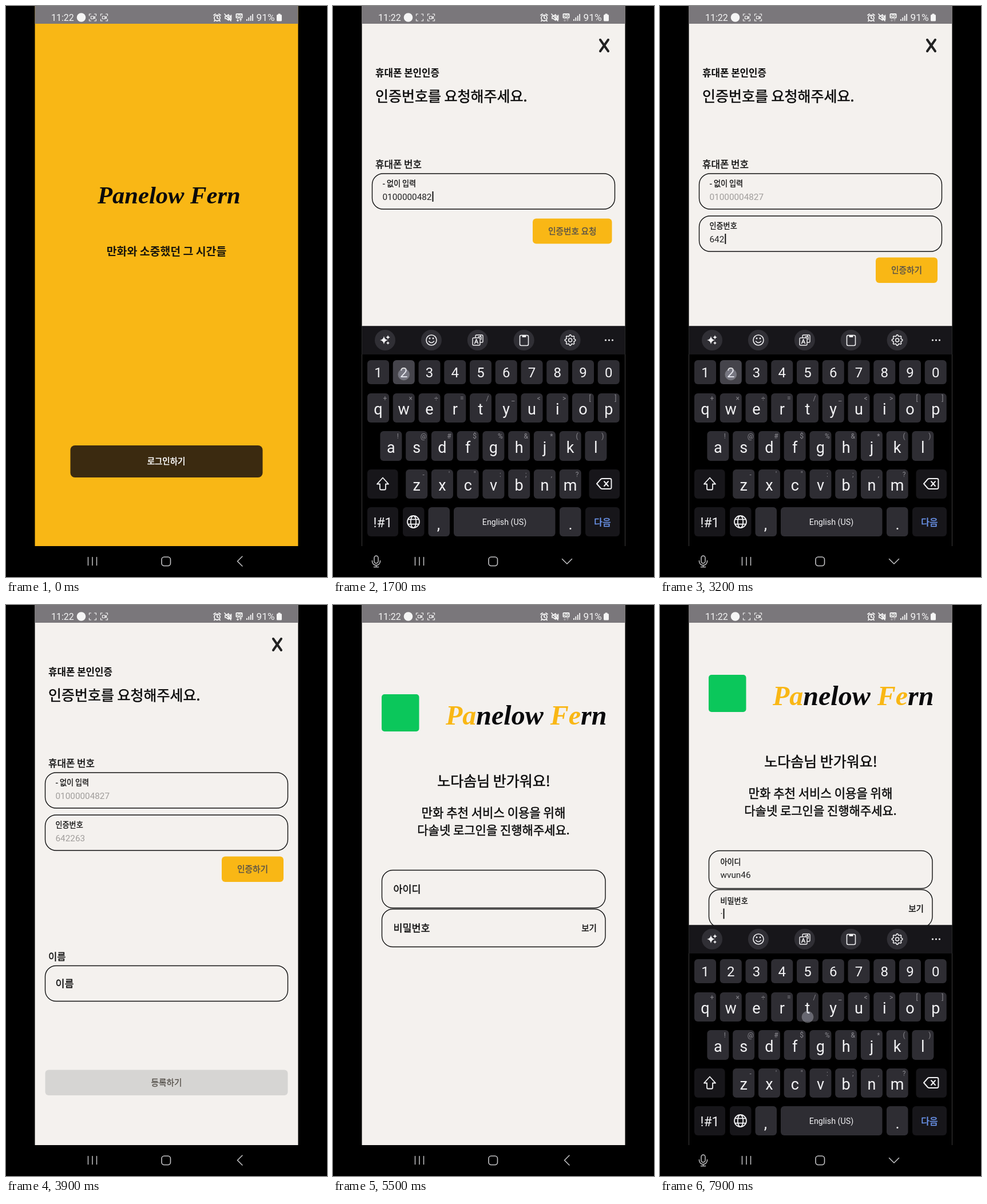
Animation of 561 by 998 pixels, one loop 8000 ms. Source, as an HTML page with a canvas:

```html
<!DOCTYPE html>
<html lang="ko">
<head>
<meta charset="utf-8">
<style>
html, body { margin: 0; width: 100%; height: 100%; overflow: hidden; background: #000; }
canvas { display: block; width: 561px; height: 998px; }
</style>
</head>
<body>
<canvas id="stage" width="561" height="998"></canvas>
<script>
const ctx = document.getElementById('stage').getContext('2d');
const LOOP = 8000, STEP = 100;
const KR = '"Noto Sans CJK KR", "Noto Sans CJK", sans-serif';
const LATIN = 'Roboto, "Noto Sans CJK KR", sans-serif';
const SCRIPT = '"Liberation Serif", serif';
const CREAM = '#f4f1ee', YELLOW = '#f9b715', KEY = '#2e2d33', DARK_KEY = '#17161a';
const LEFT = 50.5, RIGHT = 510.5, NAV_TOP = 944, KB_TOP = 559.5, KB_SLIDE = 439;

const BRAND = ['Pa', 'nelow ', 'Fe', 'rn'];
const PHONE = '01000004827', CODE = '642263', USER = 'wvun46', PERSON = '노다솜';
const COMPOSE = ['', 'ㄴ', '노', '노ㄷ', '노다', '노다소', PERSON];

// open, close, slides
const BOARDS = [[300, 2300, true], [2900, 3700, false], [4100, 4800, false], [5800, 9000, true]];
const ROWS = [
  { keys: '1234567890', x: 60, y: 619, h: 42, size: 24, hints: '' },
  { keys: 'qwertyuiop', x: 60, y: 677, h: 51, size: 27, hints: '+×÷=/_<>[]' },
  { keys: 'asdfghjkl', x: 82.4, y: 743, h: 52, size: 27, hints: '!@#$%&*()' },
  { keys: 'zxcvbnm', x: 127.2, y: 810, h: 51, size: 27, hints: '-\'":;,?' }
];
const PITCH = 44.75, KEY_W = 38;
const JAMO = ['ㄱㅋ', 'ㅣㅡ', 'ㅏㅑ', 'ㄷㅌ', 'ㄴㄹ', 'ㅓㅕ', 'ㅁㅅ', 'ㅂㅍ', 'ㅗㅛ', 'ㅈㅊ', 'ㅇㅎ', 'ㅜㅠ'];

// start, end, x, y
const TOUCHES = [
  [100, 300, 300, 797], [2000, 2200, 420, 395], [2800, 2900, 290, 399], [3600, 3700, 432, 463],
  [4000, 4100, 260, 663], [4900, 5200, 438, 834], [5700, 5800, 280, 497], [6200, 6400, 468, 884],
  [7300, 7400, 270, 545], [7700, 7800, 370, 838], [7900, 8000, 258, 720]
];
const presses = [];

function keyCenter(c) {
  const row = ROWS.find(r => r.keys.includes(c));
  return [row.x + row.keys.indexOf(c) * PITCH + KEY_W / 2, row.y + row.h / 2 + 4];
}
function jamoBox(i) {
  return [62 + (i % 3) * 111.7, 622 + Math.floor(i / 3) * 78.8, 102, 69];
}
function addPresses(str, start) {
  [...str].forEach((c, i) => {
    const at = start + i * STEP;
    presses.push([at, c]);
    TOUCHES.push([at, at + STEP, ...keyCenter(c)]);
  });
}
addPresses(PHONE, 800);
addPresses(CODE, 3000);
addPresses(USER, 6600);
[4, 8, 3, 2, 6, 6].forEach((k, i) => {
  const [x, y, w, h] = jamoBox(k);
  TOUCHES.push([4200 + i * STEP, 4300 + i * STEP, x + w / 2, y + h / 2 + 6]);
});

const clamp = (v, a, b) => Math.max(a, Math.min(b, v));
const ease = p => { p = clamp(p, 0, 1); return p * p * (3 - 2 * p); };
const count = (t, start, max) => clamp(Math.floor((t - start) / STEP) + 1, 0, max);
const typed = (str, t, start) => str.slice(0, count(t, start, str.length));

// y is the visual middle of the line; Hangul gets a hairline outline for a medium weight
function text(str, x, y, size, { color = '#0b0b0b', align = 'left', weight = 400, font = KR, heavy = 0.022 } = {}) {
  ctx.font = `${weight} ${size}px ${font}`;
  ctx.textAlign = align;
  ctx.fillStyle = ctx.strokeStyle = color;
  ctx.fillText(str, x, y + size * 0.37);
  if (font === KR && weight === 400) {
    ctx.lineWidth = size * heavy;
    ctx.strokeText(str, x, y + size * 0.37);
  }
  return ctx.measureText(str).width;
}
function box(x, y, w, h, r, fill, stroke, lw = 1.4) {
  ctx.beginPath();
  ctx.roundRect(x, y, w, h, r);
  if (fill) { ctx.fillStyle = fill; ctx.fill(); }
  if (stroke) { ctx.strokeStyle = stroke; ctx.lineWidth = lw; ctx.stroke(); }
}
function disc(x, y, r, fill) {
  ctx.beginPath();
  ctx.arc(x, y, r, 0, Math.PI * 2);
  ctx.fillStyle = fill;
  ctx.fill();
}
function icon(d, x, y, { color = '#f2f2f4', lw = 1.6, fill = false, scale = 1 } = {}) {
  ctx.save();
  ctx.translate(x, y);
  ctx.scale(scale, scale);
  ctx.lineWidth = lw;
  ctx.lineCap = ctx.lineJoin = 'round';
  ctx.strokeStyle = ctx.fillStyle = color;
  const path = new Path2D(d);
  if (fill) ctx.fill(path); else ctx.stroke(path);
  ctx.restore();
}

function brand(x, y, size, accent) {
  BRAND.forEach((part, i) => {
    x += text(part, x, y, size, { font: SCRIPT, weight: 'italic 700', color: i % 2 ? '#0a0a0c' : accent });
  });
}
function button(x, y, w, h, label, fill, color = '#55504a', size = 14.7) {
  box(x, y, w, h, 6, fill);
  text(label, x + w / 2, y + h / 2, size, { align: 'center', color });
}
function field(x, y, w, h, pad, label, value, { focus = false, color = '#222' } = {}) {
  box(x, y, w, h, 19, null, '#111');
  const mid = y + h / 2, tx = x + pad;
  if (!focus && !value) { text(label, tx, mid, 17.4); return; }
  text(label, tx, mid - 13.5, 13.1);
  const hangul = /[ㄱ-힣]/.test(value);
  const tw = text(value, tx, mid + 9, hangul ? 14.6 : 15.3, { color, font: hangul ? KR : LATIN });
  if (focus && value) {
    ctx.fillStyle = '#111';
    ctx.fillRect(tx + tw + 1, mid, 2, 18);
  }
}

function loginPage() {
  ctx.fillStyle = YELLOW;
  ctx.fillRect(LEFT, 0, RIGHT - LEFT, NAV_TOP);
  brand(160, 329, 42.6, '#0a0a0c');
  text('만화와 소중했던 그 시간들', 280.5, 429, 19.4, { align: 'center', weight: 700, color: '#1a160c' });
  box(112.5, 768, 336, 56, 8, '#3b2a10');
  text('로그인하기', 280, 796, 14.5, { align: 'center', color: '#fff', heavy: 0.04 });
}

function verifyPage(t) {
  icon('M-7-10L7 10M7-10L-7 10', 474, 69, { color: '#222', lw: 4 });
  text('휴대폰 본인인증', 74, 117, 16.8, { weight: 700 });
  text('인증번호를 요청해주세요.', 74, 158, 25);
  text('휴대폰 번호', 74, 277, 16.8);
  const sent = t >= 2200, checked = t >= 3700;
  field(68.5, 293, 424, 62, 18, '- 없이 입력', typed(PHONE, t, 800),
    { focus: t >= 400 && !sent, color: sent ? '#a09d9b' : '#222' });
  if (!sent) {
    button(349, 371.5, 138.5, 44, '인증번호 요청', YELLOW);
  } else {
    field(68.5, 367, 424, 62, 18, '인증번호', typed(CODE, t, 3000),
      { focus: t >= 2900 && !checked, color: checked ? '#a09d9b' : '#222' });
    button(377, 439.5, 108, 44.5, '인증하기', YELLOW);
  }
  if (t < 3800) return;
  const name = COMPOSE[count(t, 4200, COMPOSE.length - 1)];
  text('이름', 74, 615, 16.6);
  field(68.5, 630.5, 424, 62, 18, '이름', name, { focus: t >= 4100 && t < 4800 });
  button(68.5, 812.5, 424, 44.5, '등록하기', name ? YELLOW : '#d6d5d3');
}

function welcomePage(t) {
  box(85, 156, 65.5, 65, 5, '#0bc75b');
  brand(197, 191, 48, YELLOW);
  const mid = { align: 'center' };
  text(PERSON + '님 반가워요!', 281, 308, 25, mid);
  text('만화 추천 서비스 이용을 위해', 280.5, 363, 21.1, mid);
  text('다솔넷 로그인을 진행해주세요.', 280.5, 393, 21, mid);
  field(85.5, 463.5, 390.5, 66, 20, '아이디', typed(USER, t, 6600), { focus: t >= 5800 && t < 7400 });
  const secret = t >= 7900 ? '·' : t >= 7800 ? 'n' : '';
  field(85.5, 531.5, 390.5, 66, 20, '비밀번호', secret, { focus: t >= 7400 });
  text('보기', 461, 565, 14.6, { align: 'right' });
}

function statusBar(t) {
  ctx.fillStyle = '#7a777b';
  ctx.fillRect(LEFT, 0, RIGHT - LEFT, 31);
  const white = { color: '#f5f5f5', font: LATIN };
  text('11:22', 79, 20, 16, white);
  disc(131.5, 20, 7.8, '#f5f5f5');
  const thin = { color: '#f5f5f5', lw: 1.2 };
  [151.5, 171.5].forEach((x, i) => {
    icon('M-6-3V-6H-3M3-6H6V-3M6 3V6H3M-3 6H-6V3', x, 20, thin);
    if (i || t % 1000 < 700) icon('M-3-2H1.5V2.5H-3ZM1.5 0L4-1.5V2L1.5.8', x, 20, thin);
  });
  icon('M5 1A5 5 0 1 1-5 1A5 5 0 1 1 5 1M0-2V1L2 2M-6-4L-3-6M6-4L3-6M-4 5L-5 6.5M4 5L5 6.5', 369, 20, { ...thin, lw: 1.8 });
  icon('M-5-2H-3L1-5V5L-3 2H-5ZM3-3L4-1L3 1L4 4M5.5-4V4M-6-6L5 6', 388, 20, { ...thin, lw: 1.7 });
  box(401.5, 13, 12, 8.5, 1.5, '#f5f5f5');
  text('5G', 407.5, 17.3, 8, { align: 'center', weight: 700, color: '#777', font: LATIN });
  const busy = t < 300 || (t >= 3500 && t < 4300);
  icon('M-2.5 1V5M-4 3.5L-2.5 5L-1 3.5M2.5 5V1M1 2.5L2.5 1L4 2.5', 407.5, 21.5, { color: busy ? '#f5f5f5' : '#aaa7aa', lw: 1.1 });
  ctx.fillStyle = '#f5f5f5';
  for (let i = 0; i < 4; i++) ctx.fillRect(420 + i * 3.4, 23 - i * 3, 1.8, 3 + i * 3);
  text('91%', 437.5, 20, 17.3, white);
  box(473, 15, 9, 11.5, 1.5, '#f5f5f5');
  ctx.fillRect(475.5, 13.5, 4, 2);
}

function globe(x, y, scale = 1) {
  icon('M10 0A10 10 0 1 1-10 0A10 10 0 1 1 10 0M4.5 0A4.5 10 0 1 1-4.5 0A4.5 10 0 1 1 4.5 0M-9-4H9M-9 4H9', x, y, { lw: 1.7, scale });
}
function backspace(x, y, scale = 1) {
  icon('M-13 0L-6-8Q-5-9-3-9H10Q12.5-9 12.5-6.5V6.5Q12.5 9 10 9H-3Q-5 9-6 8ZM0-4L7 4M7-4L0 4', x, y, { lw: 1.9, scale });
}

function toolbar() {
  ctx.fillStyle = '#17161a';
  ctx.fillRect(LEFT, KB_TOP, RIGHT - LEFT, 49.5);
  const y = 584;
  for (let i = 0; i < 5; i++) disc(91 + i * 80.9, y, 18, '#302f35');
  icon('M-2-7Q-1-1 5 0Q-1 1-2 7Q-3 1-9 0Q-3-1-2-7ZM5-9Q5.5-5.5 9-5Q5.5-4.5 5-1Q4.5-4.5 1-5Q4.5-5.5 5-9ZM5 2Q5.5 4.5 8 5Q5.5 5.5 5 8Q4.5 5.5 2 5Q4.5 4.5 5 2Z', 91, y, { fill: true });
  icon('M9 0A9 9 0 1 1-9 0A9 9 0 1 1 9 0M-4.5 2Q0 7 4.5 2', 172, y);
  disc(169, 581, 1.4, '#f2f2f4');
  disc(175, 581, 1.4, '#f2f2f4');
  icon('M-4-4V-7Q-4-9-2-9H7Q9-9 9-7V2Q9 4 7 4H4M-7-4H2Q4-4 4-2V7Q4 9 2 9H-7Q-9 9-9 7V-2Q-9-4-7-4ZM-5.5 6L-2.5-1.5L.5 6M-4.5 3.5H-.5M1-6H6L4.5-7.5M6-6V-1', 253, y, { lw: 1.4 });
  box(326.5, 575.5, 15, 18, 2.5, null, '#f2f2f4', 1.6);
  box(330.5, 575, 7, 4, 1, '#f2f2f4');
  ctx.beginPath();
  for (let i = 0; i <= 64; i++) {
    const a = i / 64 * Math.PI * 2, r = 8.2 + 1.2 * Math.cos(a * 8);
    ctx.lineTo(414.6 + r * Math.cos(a), y + r * Math.sin(a));
  }
  ctx.lineWidth = 1.6;
  ctx.strokeStyle = '#f2f2f4';
  ctx.stroke();
  box(411.6, 581, 6, 6, 3, null, '#f2f2f4', 1.5);
  [476.5, 482.5, 488.5].forEach(x => disc(x, y, 1.6, '#f2f2f4'));
}

const glyph = { color: '#f2f2f4', align: 'center', font: LATIN };
const hint = { color: '#8b8a90', align: 'center', font: LATIN };
const next = { color: '#6f9af5', align: 'center' };

function latinKeys(t) {
  const now = presses.find(p => t === p[0]);
  for (const row of ROWS) {
    [...row.keys].forEach((c, i) => {
      const x = row.x + i * PITCH;
      box(x, row.y, KEY_W, row.h, 6, now && now[1] === c ? '#45444b' : KEY);
      text(c, x + KEY_W / 2, row.y + row.h / 2 + (row.hints ? 2 : 0.5), row.size, glyph);
      if (row.hints) text(row.hints[i], x + 31, row.y + 9, 12, hint);
    });
  }
  box(60, 810, 53.5, 51, 6, DARK_KEY);
  icon('M0-11L10 0H5V8Q5 10 3 10H-3Q-5 10-5 8V0H-10Z', 87, 835.5, { lw: 1.8 });
  box(447.5, 810, 53.5, 51, 6, DARK_KEY);
  backspace(474, 835);
  [[60, 54, DARK_KEY], [122, 37.5, DARK_KEY], [166.5, 37.5, KEY], [211, 177.5, KEY], [396, 37.5, KEY], [441, 60, DARK_KEY]]
    .forEach(([x, w, fill]) => box(x, 876, w, 51, 6, fill));
  text('!#1', 87, 902, 23, glyph);
  globe(140.5, 901.5, 1.05);
  text(',', 184.5, 905, 27, glyph);
  text('English (US)', 299.5, 902, 14.3, glyph);
  text('.', 415, 905, 27, glyph);
  text('다음', 471, 902, 16, next);
}

function hangulKeys() {
  JAMO.forEach((pair, i) => {
    const [x, y, w, h] = jamoBox(i);
    box(x, y, w, h, 6, KEY);
    text(pair, x + w / 2, y + h / 2, 28, { ...glyph, font: KR, heavy: 0.03 });
    const n = '123456789'[i] || (i === 10 ? '0' : '');
    text(n, x + w - 8, y + 13, 16, hint);
  });
  [[397.5, 622, 102], [397.5, 701, 102], [397.5, 780, 46], [453, 780, 46.5], [397.5, 858.5, 46], [453, 858.5, 46.5]]
    .forEach(([x, y, w]) => box(x, y, w, 69, 6, DARK_KEY));
  backspace(448.5, 657, 1.28);
  text('KR', 448.5, 727, 13.5, glyph);
  icon('M-19-4V2Q-19 4-17 4H17Q19 4 19 2V-4', 448.5, 747, { lw: 2 });
  text('?', 420, 816, 36, glyph);
  text('다음', 476, 815, 20.5, next);
  text('!#1', 420.5, 893, 29.5, glyph);
  globe(476, 892.5, 1.35);
}

function keyboard(t, shift) {
  ctx.save();
  ctx.translate(0, shift);
  ctx.fillStyle = '#000';
  ctx.fillRect(LEFT, KB_TOP, RIGHT - LEFT, 998);
  toolbar();
  if (t >= 4100 && t < 6400) hangulKeys(); else latinKeys(t);
  ctx.restore();
}

function navBar(open) {
  const c = { color: '#c4c4c6', lw: 1.5 };
  icon('M-7.5-7V7M0-7V7M7.5-7V7', 151, 970.5, c);
  box(272, 963, 15.5, 15.5, 4.5, null, c.color, 1.6);
  icon(open ? 'M-8.5-4L0 4.5L8.5-4' : 'M4-8.5L-4.5 0L4 8.5', 409, 970.5, c);
  if (open) icon('M-3.5-6A3.5 3.5 0 0 1 3.5-6V0A3.5 3.5 0 0 1-3.5 0ZM-7-1V0A7 7 0 0 0 7 0V-1M0 7V10M-4 10H4', 75.5, 970.5, c);
}

function boardState(t) {
  for (const [from, to, slides] of BOARDS) {
    if (t >= from && t < to) return { open: true, shift: slides ? KB_SLIDE * (1 - ease((t - from) / 278)) : 0 };
    if (slides && t >= to && t < to + 278) return { open: false, shift: KB_SLIDE * ease((t - to) / 278) };
  }
  return { open: false, shift: KB_SLIDE };
}

function pagePan(t) {
  if (t >= 4100 && t < 4800) return 132;
  return 34 * ease((t - 7300) / 250);
}

function draw(t) {
  ctx.fillStyle = '#000';
  ctx.fillRect(0, 0, 561, 998);
  ctx.save();
  ctx.beginPath();
  ctx.rect(0, 0, 561, NAV_TOP);
  ctx.clip();
  if (t < 300) {
    loginPage();
  } else {
    ctx.fillStyle = CREAM;
    ctx.fillRect(LEFT, 0, RIGHT - LEFT, NAV_TOP);
    ctx.translate(0, -pagePan(t));
    if (t < 5400) verifyPage(t); else welcomePage(t);
  }
  ctx.restore();
  statusBar(t);
  const { open, shift } = boardState(t);
  if (shift < KB_SLIDE) keyboard(t, shift);
  navBar(open);
  for (const [from, to, x, y] of TOUCHES) {
    if (t < from || t >= to) continue;
    disc(x, y, 10, y > KB_TOP && open ? 'rgba(215,218,235,.34)' : 'rgba(245,245,240,.6)');
    ctx.strokeStyle = 'rgba(130,130,130,.5)';
    ctx.lineWidth = 1;
    ctx.stroke();
  }
}

function frame(now) {
  draw(Math.floor((now % LOOP) / STEP) * STEP);
  requestAnimationFrame(frame);
}
draw(0);
requestAnimationFrame(frame);
</script>
</body>
</html>
```
